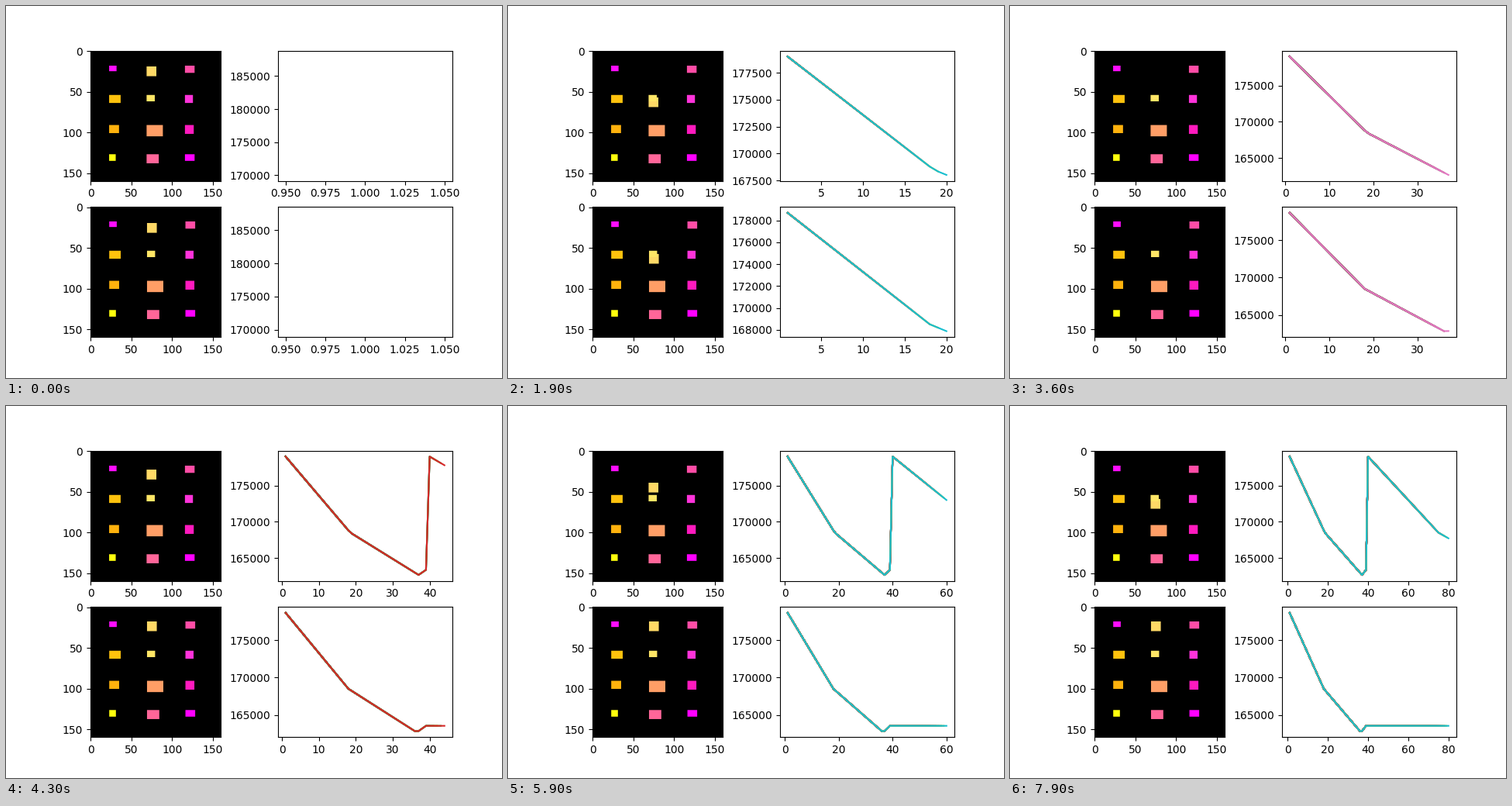
A matplotlib script that plays this animation: 640x480 px, repeating every 8000 ms.

```python
from colorsys import hsv_to_rgb

import numpy as np
import matplotlib.pyplot as plt
from matplotlib.animation import FuncAnimation

STEPS = 80
RESET = 39  # step at which both falling blocks start over
SIZE = 160

# Width, height and hue in degrees, row by row on a 3-column grid.
BLOCKS = [
    [(9, 7, 300), (12, 12, 45), (12, 9, 330)],
    [(14, 10, 45), (10, 8, 50), (10, 10, 311)],
    [(12, 10, 41), (20, 14, 22), (11, 11, 317)],
    [(8, 8, 60), (15, 11, 340), (12, 8, 300)],
]


def block_color(row, col, hue):
    """Strong on the left, pastel in the middle, richer downwards on the right."""
    sat = (0.95, 0.6, 0.7 + 0.1 * row)[col]
    return np.round(255 * np.array(hsv_to_rgb(hue / 360, sat, 1)))


def scene(drop):
    """Grid of blocks; the top middle one has fallen by `drop` rows."""
    img = np.zeros((SIZE, SIZE, 3), np.uint8)
    for row, cells in enumerate(BLOCKS):
        for col, (w, h, hue) in enumerate(cells):
            x = int(23 + 46.5 * col)
            y = round(18 + 36.3 * row)
            if (row, col) == (0, 1):
                y += drop
            img[y:y + h, x:x + w] = block_color(row, col, hue)
    return img


def score(fall):
    """Steep descent, gentler descent, then a rise past the turning point."""
    return np.interp(fall, [0, 35, 72, 77], [179000, 168500, 162654, 163529])


steps = np.arange(STEPS)
falling = steps < RESET
upper_fall = np.where(falling, 2 * steps, steps - RESET)
lower_fall = np.where(falling, 2 * steps + 1, -1)  # rests after the reset
upper = score(upper_fall)
lower = np.where(falling, score(lower_fall), score(77))

fig, axes = plt.subplots(2, 2, figsize=(6.4, 4.8), dpi=100)
falls = (upper_fall, lower_fall)
images = [ax.imshow(scene(fall[0] + 1)) for ax, fall in zip(axes[:, 0], falls)]
charts = axes[:, 1]

# Every step lays a fresh, longer line over the earlier ones.
lines = [[ax.plot(steps[:k + 1] + 1, data[:k + 1], color=f"C{k % 10}")[0]
          for k in range(STEPS)]
         for ax, data in zip(charts, (upper, lower))]


def update(n):
    for image, fall in zip(images, falls):
        image.set_data(scene(fall[n] + 1))
    for ax, group in zip(charts, lines):
        for k, line in enumerate(group):
            line.set_visible(k <= n)
        ax.relim(visible_only=True)
        ax.autoscale_view()
    return images


anim = FuncAnimation(fig, update, frames=STEPS, interval=100,
                     repeat=True, repeat_delay=0)
plt.show()
```
